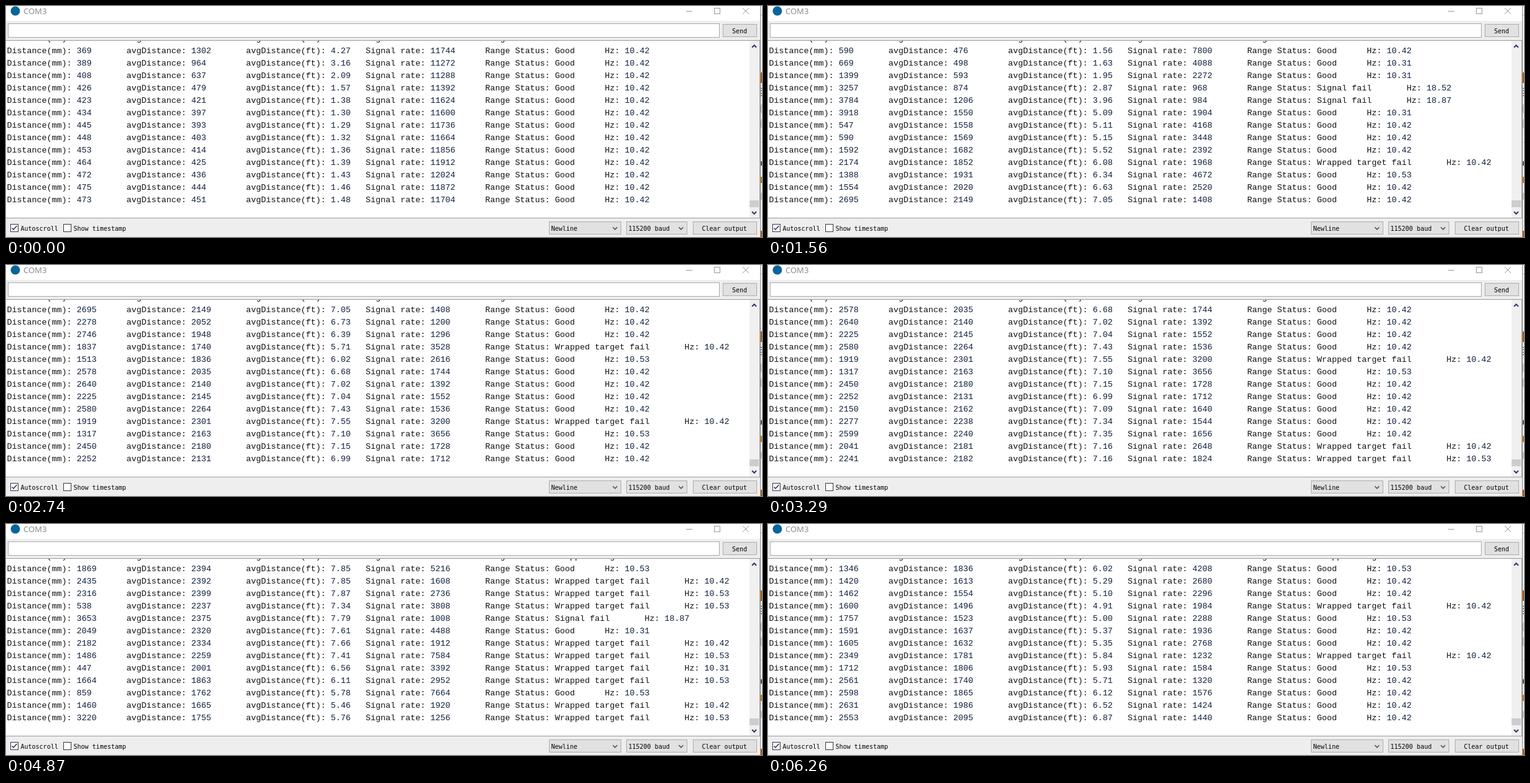
An HTML page with a canvas for the animation above (6.34 s loop, 1214x372 px).

```html
<!DOCTYPE html>
<html lang="en">
<head>
<meta charset="utf-8">
<title>Serial monitor</title>
<style>
  html, body { margin: 0; width: 100%; height: 100%; overflow: hidden; background: #fff; }
  canvas { display: block; width: 1214px; height: 372px; }
</style>
</head>
<body>
<canvas id="stage" width="1214" height="372"></canvas>
<script>
const ctx = document.getElementById('stage').getContext('2d');
const LOOP = 6340, LAST_TICK = 80, VISIBLE = 13;
const LOG_X = 1.5, CELL = 8, TAB = 8;
const LOG_FONT = '13.333px "Liberation Mono", monospace';
const UI_FONT = '10px "DejaVu Sans Mono", monospace';

// distance/rate[/status[/Hz]]
const LOG = `350/11800
369/11744 389/11272 408/11288 426/11392 423/11624 434/11600 445/11736 448/11664
453/11856 464/11912 472/12024 475/11872 473/11704 468/11640 476/10968
590/7800 669/4088/g/10.31 1399/2272/g/10.31 3257/968/s/18.52 3784/984/s 3918/1904
547/4168 590/3448 1592/2392 2174/1968/w 1388/4672 1554/2520 2695/1408
2278/1200 2746/1296 1837/3528/w 1513/2616 2578/1744 2640/1392 2225/1552 2580/1536
1919/3200/w 1317/3656 2450/1728 2252/1712 2150/1640 2277/1544 2599/1656 2041/2648/w 2241/1824/w
3020/1224/w 3042/2064/w 1869/5216 2435/1608/w 2316/2736/w 538/3808/w 3653/1008/s
2049/4488 2182/1912/w 1486/7584/w 447/3392/w/10.31 1664/2952/w 859/7664 1460/1920/w 3220/1256/w
1346/4208 1420/2680 1462/2296 1600/1984/w 1757/2288 1591/1936 1605/2768 2349/1232/w
1712/1584 2561/1320 2598/1576 2631/1424 2553/1440`;

const STATUS = { g: 'Good', s: 'Signal fail', w: 'Wrapped target fail' };
const HZ_AFTER = { g: '10.42', s: '10.31', w: '10.53' };

function buildRows() {
  const recent = [3769, 3678, 2006, 1003, 674, 485, 348, 343];
  let prev = 'g';
  return LOG.split(/\s+/).map(entry => {
    const [dist, rate, code = 'g', rareHz] = entry.split('/');
    recent.push(+dist);
    if (recent.length > 10) recent.shift();
    const avg = Math.floor(recent.reduce((a, b) => a + b) / 10);
    const hz = rareHz || (code === 's' ? '18.87' : HZ_AFTER[prev]);
    prev = code;
    return [
      ['Distance(mm): ', dist],
      ['avgDistance: ', String(avg)],
      ['avgDistance(ft): ', (avg / 304.8).toFixed(2)],
      ['Signal rate: ', rate],
      ['Range Status: ' + STATUS[code], ''],
      ['Hz: ', hz]
    ];
  });
}
const rows = buildRows();

// Refresh ticks: [tick, ms], evenly spaced in between
const ANCHORS = [[0, 0], [1, 70], [9, 700], [10, 770], [17, 1320], [18, 1410], [20, 1560],
  [26, 2040], [27, 2110], [30, 2360], [35, 2740], [37, 2900], [38, 2980], [40, 3130],
  [42, 3290], [44, 3460], [52, 4070], [54, 4220], [56, 4380], [62, 4870], [64, 5020],
  [66, 5170], [68, 5320], [73, 5700], [75, 5860], [LAST_TICK, 6260]];

function tickStart(k) {
  const i = Math.max(1, ANCHORS.findIndex(a => a[0] >= k));
  const [k0, t0] = ANCHORS[i - 1], [k1, t1] = ANCHORS[i];
  return t0 + (t1 - t0) * (k - k0) / (k1 - k0);
}

const IDLE = new Set([36, 39, 43, 55, 63, 67, 74]);
const PARTIAL = new Set([3, 7, 11, 15, 19, 23, 27, 32, 47, 51, 59, 71, 78]);
const ticks = [];
for (let k = 0, added = 0; k <= LAST_TICK; k++) {
  if (k && !IDLE.has(k) && !PARTIAL.has(k)) added++;
  ticks.push({ start: tickStart(k), added, partial: PARTIAL.has(k) ? 24 + k * 37 % 60 : 0 });
}

function box(x, y, w, h, fill, line) {
  ctx.fillStyle = line || fill;
  ctx.fillRect(x, y, w, h);
  if (line) {
    ctx.fillStyle = fill;
    ctx.fillRect(x + 1, y + 1, w - 2, h - 2);
  }
}

function path(points, color, width = 1) {
  ctx.strokeStyle = color;
  ctx.lineWidth = width;
  ctx.beginPath();
  points.forEach(([x, y], i) => i ? ctx.lineTo(x, y) : ctx.moveTo(x, y));
  ctx.stroke();
}

function text(s, x, y, font, color = '#000') {
  ctx.font = font;
  ctx.fillStyle = color;
  ctx.fillText(s, x, y);
}

function chevron(x, y, dir, color, width = 1.6) {
  const r = 3.5;
  path([[x - r, y - dir * r / 2], [x, y + dir * r / 2], [x + r, y - dir * r / 2]], color, width);
}

function drawRow(row, y, limit = Infinity) {
  let col = 0;
  for (const [label, value] of row) {
    if (col >= limit) return;
    const room = limit - col, at = col + label.length;
    text(label.slice(0, room), LOG_X + col * CELL, y, LOG_FONT, '#111');
    if (value && room > label.length) {
      text(value.slice(0, room - label.length), LOG_X + at * CELL, y, LOG_FONT, '#0b1c38');
    }
    col = (Math.floor((at + value.length) / TAB) + 1) * TAB;
  }
}

function drawLog({ added, partial }) {
  box(0, 56, 1194, 285, '#fff');
  ctx.save();
  ctx.beginPath();
  ctx.rect(0, 56, 1194, 285);
  ctx.clip();
  for (let i = 0; i <= VISIBLE; i++) drawRow(rows[added + i], 56 + i * 20);
  const next = rows[added + VISIBLE + 1];
  if (partial && next) drawRow(next, 56 + (VISIBLE + 1) * 20, partial);
  ctx.restore();
}

function drawTitle() {
  box(0, 0, 1211, 24, '#fff');
  ctx.fillStyle = '#06659a';
  ctx.beginPath();
  ctx.arc(15, 8, 7.5, 0, Math.PI * 2);
  ctx.fill();
  text('COM3', 28, 13, '13px "Noto Sans", sans-serif', '#8c8c8c');
  box(1092, 8, 10, 1, '#999');
  box(1137, 3, 10, 10, '#fff', '#999');
  path([[1183, 3], [1193, 13]], '#999');
  path([[1193, 3], [1183, 13]], '#999');
}

function drawInput() {
  box(3, 28, 1143, 23, '#fff', '#a9a9a9');
  box(1151, 29, 55, 21, '#e1e1e1', '#adadad');
  text('Send', 1166, 44, UI_FONT);
}

function drawScrollbar() {
  box(1194, 56, 16, 285, '#f0f0f0');
  chevron(1201.5, 65, -1, '#4b2d66', 2);
  box(1194, 313, 15, 11, '#cdcdcd');
  chevron(1201.5, 333, 1, '#4b2d66', 2);
}

function checkbox(x, label, on) {
  box(x, 351, 13, 13, '#fff', '#3b3340');
  if (on) path([[x + 2.5, 357.5], [x + 5, 360], [x + 10.5, 354]], '#3b1f55', 1.4);
  text(label, x + 16.5, 362, UI_FONT);
}

function combo(x, w, label) {
  box(x, 347, w, 21, '#e1e1e1', '#adadad');
  text(label, x + 3.5, 362, UI_FONT);
  chevron(x + w - 10, 358, 1, '#55505c');
}

function drawFooter(hover) {
  checkbox(7, 'Autoscroll', true);
  checkbox(92, 'Show timestamp', false);
  combo(872, 116, 'Newline');
  combo(996, 98, '115200 baud');
  box(1103, 347, 103, 21, hover ? '#e5f1fb' : '#e1e1e1', hover ? '#4a86b8' : '#adadad');
  text('Clear output', 1117.5, 362, UI_FONT);
}

// Sliver of the desktop beside the window
function drawEdge() {
  box(1211, 0, 1, 372, '#8c8c8c');
  box(1212, 0, 2, 372, '#f4f4f4');
  box(1212, 14, 2, 1, '#b5b5b5');
  box(1212, 107, 2, 17, '#b35a08');
  for (let y = 132; y < 146; y += 4) box(1212, y, 2, 1, '#444');
  for (const y of [158, 182]) {
    path([[1214, y], [1212.5, y + 3], [1212.5, y + 12], [1214, y + 15]], '#a0a4aa');
  }
  box(1212, 219, 2, 1, '#c8c8c8');
  box(1212, 250, 2, 7, '#555');
  box(1212, 275, 2, 10, '#c9780f');
  box(1212, 301, 2, 11, '#c4c4c4');
  box(1212, 362, 2, 10, '#b35a08');
}

function draw(t) {
  let k = LAST_TICK;
  while (ticks[k].start > t) k--;
  const hover = (t >= 1250 && t < 1410) || (t >= 3990 && t < 4220);
  box(0, 0, 1214, 372, '#eee');
  drawTitle();
  drawInput();
  drawLog(ticks[k]);
  drawScrollbar();
  box(0, 55, 1211, 1, '#9a9a9a');
  box(0, 341, 1211, 1, '#9a9a9a');
  box(1210, 55, 1, 287, '#9a9a9a');
  drawFooter(hover);
  drawEdge();
}

const begin = performance.now();
function loop() {
  draw((performance.now() - begin) % LOOP);
  requestAnimationFrame(loop);
}
loop();
</script>
</body>
</html>
```
